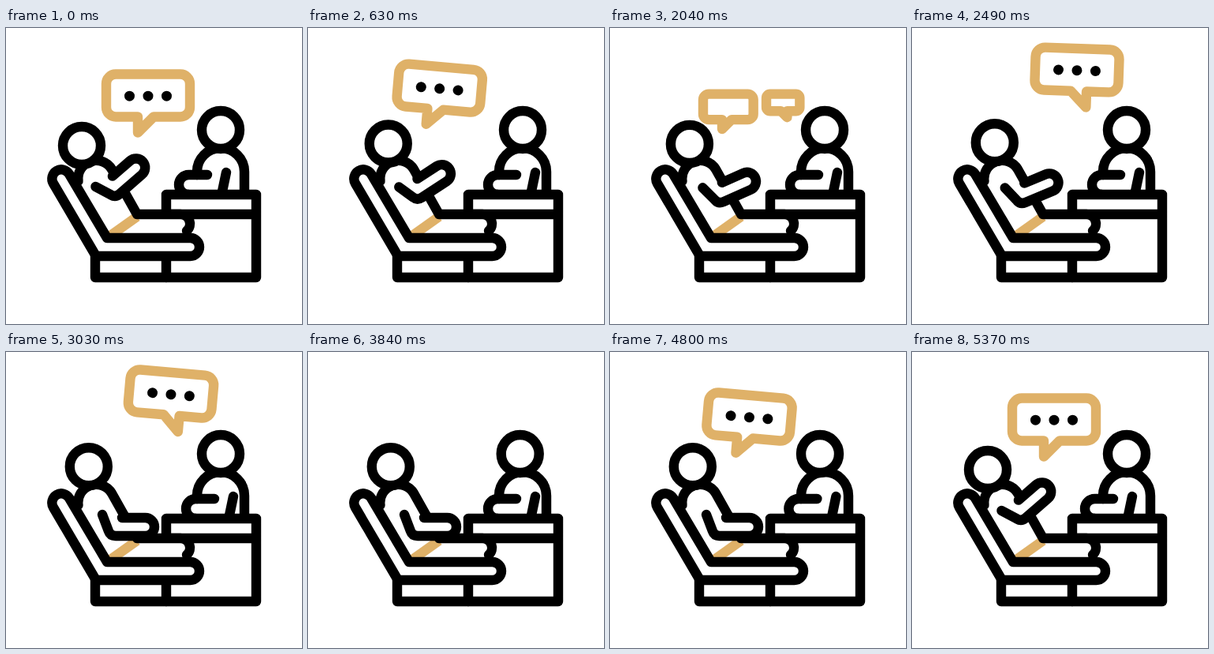
Recreate the animation shown at these times as an HTML page. Size 375 px wide and 375 px high, loop 5.4 s.

```html
<!DOCTYPE html>
<html lang="en">
<head>
<meta charset="utf-8">
<title>Consultation</title>
<style>
  html, body { margin: 0; width: 100%; height: 100%; overflow: hidden; background: #fff; }
  svg { display: block; width: 375px; height: 375px; }
  .line { fill: none; stroke: #000; stroke-width: 12.4; stroke-linecap: round; stroke-linejoin: round; }
  .solid { fill: #fff; }
  .tan { stroke: #dfb168; }
  .bubble path { vector-effect: non-scaling-stroke; }
</style>
</head>
<body>
<svg viewBox="0 0 375 375">
  <g id="patientBubble" class="bubble"></g>
  <g id="doctorBubble" class="bubble"></g>

  <g class="line">
    <!-- doctor -->
    <path d="M242 186V182A30 30 0 0 1 302 182V211"/>
    <path id="doctorArm" d="M264 186H240.500A12.500 12.500 0 0 0 240.500 211M288 183L283 207"/>
    <circle id="doctorHead" class="solid" cy="129" r="24"/>

    <!-- desk and chair -->
    <path class="solid" d="M203 211H317V316H203ZM203 236H317"/>
    <path d="M113 289V316H203"/>
    <path d="M180 236H221A12 12 0 0 1 221 260H180Z" fill="#fff" stroke="none"/>
    <path class="tan" d="M128 266L166 239" stroke-linecap="butt"/>
    <path class="solid" d="M128 266H233.500A11.500 11.500 0 0 1 233.500 289H114L60 197A11.500 11.500 0 0 1 80 185Z"/>

    <!-- patient -->
    <path d="M91.500 194A23 23 0 0 1 134 179L166 236H221A12 12 0 0 1 229 257"/>
    <path id="patientArm" class="solid" d="M122 206L130 227Q132 233 139 233H176.500A11.500 11.500 0 0 0 176.500 210H147"/>
    <circle id="patientHead" class="solid" r="24"/>
  </g>
</svg>
<script>
const LOOP = 5400, BEAT = 450;
const BALLOON = 'M-13 27H-41A12 12 0 0 1 -53 15V-15A12 12 0 0 1 -41 -27H41A12 12 0 0 1 53 -15V15A12 12 0 0 1 41 27H7L-13 47Z';
const el = id => document.getElementById(id);
const clamp = (x, lo, hi) => Math.min(hi, Math.max(lo, x));
const mix = (a, b, p) => a + (b - a) * p;
const ease = x => (1 - Math.cos(Math.PI * x)) / 2;
const set = (node, attrs) => {
  for (const k in attrs) node.setAttribute(k, attrs[k]);
};

function buildBubble(node, flip) {
  const dots = [-23.5, 0, 23.5].map(x => `<circle cx="${x}" cy=".7"/>`).join('');
  node.innerHTML = `<path class="line tan" d="${BALLOON}" transform="scale(${flip} 1)"/>${dots}`;
}

// A bubble grows out of the speaker's mouth up to its own place.
function placeBubble(node, mouth, place, tilt, size) {
  const [x, y] = mouth.map((m, i) => mix(m, place[i], size));
  set(node, {
    transform: `translate(${x} ${y}) rotate(${5 * tilt}) scale(${size})`,
    visibility: size > 0.01 ? 'visible' : 'hidden'
  });
  const r = 6.5 * Math.max(0, 4 * size - 3);
  node.querySelectorAll('circle').forEach(dot => set(dot, { r }));
}

function draw(t) {
  // One eased step from 0 to 1, and a swing 0-1-0-1 that changes every beat.
  const ramp = (from, to = from + BEAT) => ease(clamp((t - from) / (to - from), 0, 1));
  const swing = (from, beats) => ease(clamp((t - from) / BEAT, 0, beats));

  const begin = ramp(0), leanBack = ramp(4800, 5340);
  const swap = ramp(1845), reply = ramp(3840, 4200), doctorEnds = ramp(3420, 3810);

  const lean = swing(0, 5) * (1 - leanBack);
  set(el('patientHead'), { cx: 96 + 8.8 * lean, cy: 149 - 3.8 * lean });

  const armAngle = -41 * (1 - ramp(2280) + leanBack) + 31 * swing(480, 4);
  set(el('patientArm'), { transform: `rotate(${armAngle} 111 215)` });

  set(el('doctorHead'), { cx: 272 - 6 * swing(3180, 3) * (1 - ramp(4950, 5370)) });
  set(el('doctorArm'), { transform: `translate(${-9 * (1 - begin + ramp(4650, 5190))} 0)` });

  const settle = ramp(4380, 4800);
  const tilt = begin - ramp(1350, 1845) + reply - ramp(4800, 5130);
  const lift = swing(0, 3) - settle;
  const place = [
    180 - 3.5 * tilt - 15 * lift - 9 * (reply - settle),
    85.5 - 3.5 * tilt - 9 * lift
  ];
  placeBubble(el('patientBubble'), [127, 135], place, tilt, 1 - swap + reply);
  placeBubble(el('doctorBubble'), [226, 122], [209, 53], ramp(2295) - doctorEnds, swap - doctorEnds);
}

buildBubble(el('patientBubble'), 1);
buildBubble(el('doctorBubble'), -1);

const start = performance.now();
function tick() {
  draw((performance.now() - start) % LOOP);
  requestAnimationFrame(tick);
}
tick();
</script>
</body>
</html>
```
